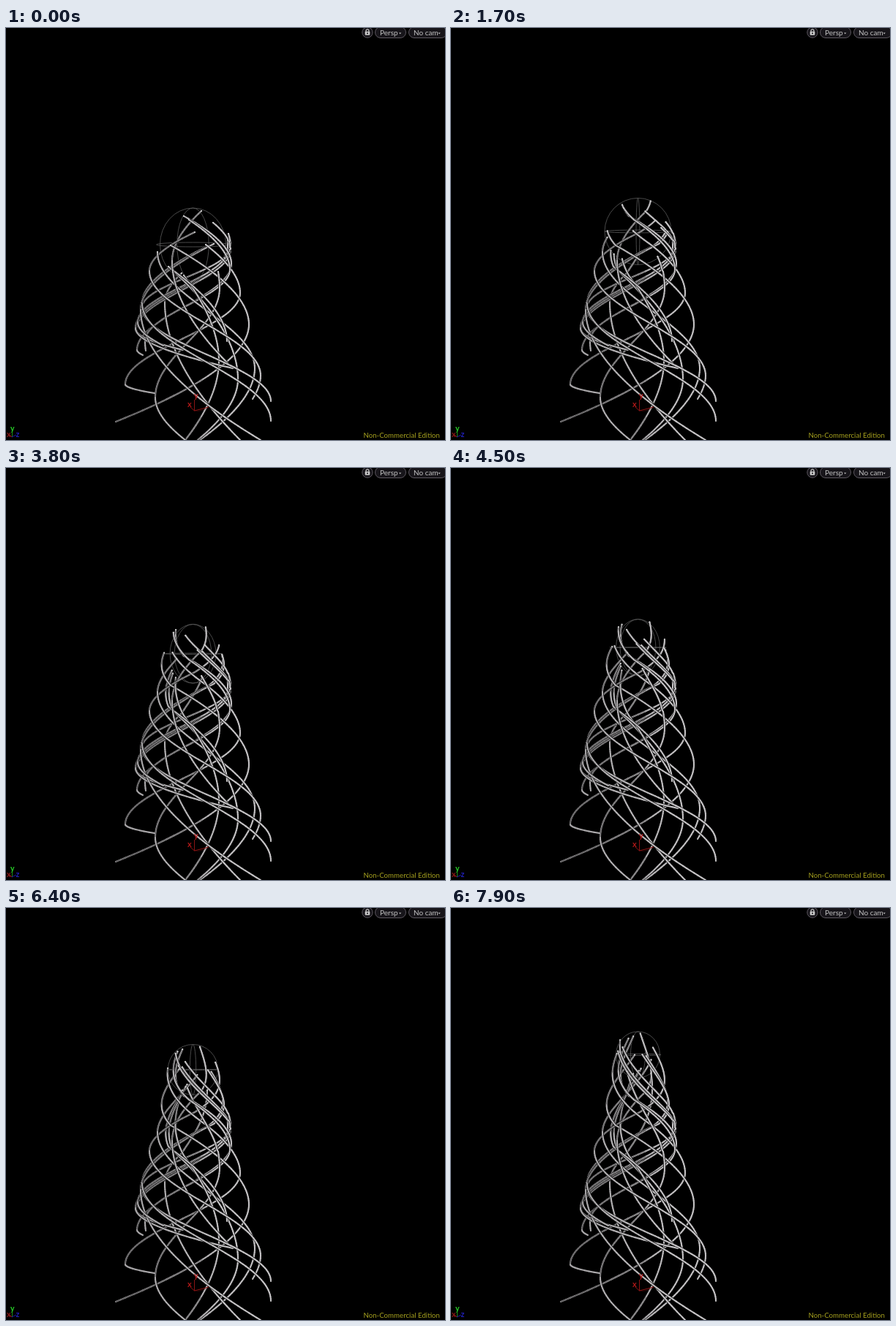
An HTML page with a canvas for the animation above (8 s loop, 600x563 px).

```html
<!DOCTYPE html>
<html>
<head>
<meta charset="utf-8">
<style>
html, body { margin: 0; width: 100%; height: 100%; overflow: hidden; background: #000; }
canvas, svg { position: absolute; left: 0; top: 0; width: 600px; height: 563px; }
text { font-family: Lato, "Open Sans", sans-serif; }
</style>
</head>
<body>
<canvas id="view" width="600" height="563"></canvas>
<svg viewBox="0 0 600 563">
  <g fill="none" stroke="#8c1414">
    <path d="M257.500 508V523L252 518M257.500 523L277 518"/>
    <path d="M257 523Q270 525 277 516" opacity=".35"/>
  </g>
  <g font-weight="bold" font-size="11" fill="#b01818">
    <text x="257" y="506">y</text>
    <text x="248" y="518">x</text>
  </g>
  <path d="M8.500 553V559" stroke="#1a8a1a"/>
  <path d="M8 559L14 556" stroke="#1a1aa8"/>
  <path d="M8 559L5 556" stroke="#a01818"/>
  <g font-weight="bold" font-size="10.500">
    <text x="6" y="551" fill="#28d028">y</text>
    <text x="1" y="559" fill="#8c1818">x</text>
    <text x="13.500" y="559" fill="#2020b8">z</text>
  </g>
  <g fill="#17151a" stroke="#5b565e">
    <circle cx="494" cy="6" r="7.200"/>
    <rect x="504.500" y="-1.500" width="42" height="15" rx="7.500"/>
    <rect x="550.500" y="-1.500" width="52" height="15" rx="7.500"/>
  </g>
  <path d="M492 5V3.800a2 2 0 0 1 4 0V5" fill="none" stroke="#ccc" stroke-width="1.200"/>
  <rect x="490.700" y="4.800" width="6.600" height="5" rx=".8" fill="#ccc"/>
  <circle cx="494" cy="7.200" r="1" fill="#17151a"/>
  <g font-size="10" fill="#c4c4c4">
    <text x="511" y="9.500">Persp</text>
    <text x="557" y="9.500">No cam</text>
    <path d="M537 6.500h3.400l-1.700 1.700zM590.500 6.500h3.400l-1.700 1.700z"/>
  </g>
  <text x="593" y="560" text-anchor="end" font-size="9.700" fill="#a6a11e">Non-Commercial Edition</text>
</svg>
<script>
const g = document.getElementById('view').getContext('2d');
const LOOP = 8000, SPIN = 17 * Math.PI / 180, CX = 255.5;

// moments at which the simulation advances, in tenths of a second
const steps = [0, 4, 6, 8, 10, 12, 14, 17, 19, 20, 21, 24, 26, 28, 30, 32, 33, 35, 38, 40,
  43, 45, 47, 50, 52, 55, 57, 59, 61, 62, 64, 67, 69, 72, 74, 77, 79];

// each strand from its tip downwards: tip, widest points left and right, root
const strands = [
  [225, 297, 332, 405, 150, 538],
  [273, 296, 320, 362, 163, 487, 203, 499],
  [207, 306, 207, 306, 340, 465, 265, 563],
  [222, 326, 317, 480, 262, 563],
  [243, 338, 291, 455, 245, 563],
  [228, 331, 302, 428],
  [267, 250, 227, 318, 310, 465],
  [290, 333, 292, 355, 204, 505, 245, 563],
  [240, 335, 217, 375, 320, 563],
  [243, 257, 308, 322, 179, 440, 187, 447],
  [250, 262, 306, 330, 190, 428, 191, 441],
  [283, 266, 307, 302, 178, 412, 242, 440],
  [304, 281, 307, 298, 177, 410, 310, 465],
  [305, 292, 306, 300, 186, 382, 362, 510, 362, 510],
  [276, 298, 186, 376, 362, 537, 362, 537],
  [258, 279, 196, 332, 348, 475, 337, 507],
  [284, 295, 184, 385, 348, 563],
  [303, 290, 303, 303, 180, 402, 215, 434]
].map(build);

function riseAt(t) { return 296 - 10.2 * t - .24 * t * t; }
function tilt(c) { return .001 * (c - 236); }
function radius(c) {
  const d = c - 296;
  return 50 + .26 * d + .0007 * d * d;
}

// a bend through p..q, upright at every widest point and free at the two ends
function bend(p, q, freeStart, freeEnd) {
  const dy = q.y - p.y, free = freeStart || freeEnd;
  const a = freeStart ? { x: q.x, y: q.y - .45 * dy } : { x: p.x, y: p.y + (free ? .45 : .38) * dy };
  const b = free ? a : { x: q.x, y: q.y - .38 * dy };
  const n = Math.max(4, Math.round(Math.hypot(q.x - p.x, dy) / 4)), out = [];
  for (let i = 0; i < n; i++) {
    const u = i / n, v = 1 - u;
    const mix = k => free
      ? v * v * p[k] + 2 * u * v * a[k] + u * u * q[k]
      : v * v * v * p[k] + 3 * u * v * v * a[k] + 3 * u * u * v * b[k] + u * u * u * q[k];
    out.push({ x: mix('x'), y: mix('y') });
  }
  return out;
}

function build(nums) {
  const knots = [];
  for (let i = 0; i < nums.length; i += 2) knots.push({ x: nums[i], y: nums[i + 1] });
  const last = knots.length - 1, tip = knots[0];
  const path = knots.slice(0, last).flatMap((p, i) =>
    p.x === knots[i + 1].x && p.y === knots[i + 1].y ? []
      : last === 1 ? bend(p, { x: knots[1].x, y: knots[1].y }, true)
      : bend(p, knots[i + 1], i === 0, i === last - 1));
  path.push(knots[last]);
  // place the tip on the sphere: a strand heading left is on the near side
  const side = knots[1].x >= tip.x ? 1 : -1, c = riseAt(0), r = radius(c), dx = tip.x - CX;
  const depth = side * Math.sqrt(Math.max(0, r * r - dx * dx - (c - tip.y) ** 2));
  const h = (c - tip.y + tilt(c) * depth) / r;
  const flat = Math.sqrt(1 - h * h);
  const az = side * Math.acos(Math.max(-1, Math.min(1, dx / r / flat)));
  return { root: path.reverse(), h, flat, az };
}

function spot(s, t) {
  const c = riseAt(t), r = radius(c), a = s.az + SPIN * t;
  return {
    x: CX + r * s.flat * Math.cos(a),
    y: c - r * s.h + tilt(c) * r * s.flat * Math.sin(a)
  };
}

function trail(s, t) {
  const pts = s.root.slice();
  for (let u = .15; u < t; u += .15) pts.push(spot(s, u));
  if (t) pts.push(spot(s, t));
  return pts;
}

// cut a trail where it turns from the near side to the far side
function halves(pts) {
  const runs = [];
  for (let i = 1; i < pts.length; i++) {
    const near = pts[i].x < pts[i - 1].x, run = runs[runs.length - 1];
    if (run && run.near === near) run.pts.push(pts[i]);
    else runs.push({ near, pts: [pts[i - 1], pts[i]] });
  }
  return runs;
}

function line(pts, color, width) {
  g.strokeStyle = color;
  g.lineWidth = width;
  g.beginPath();
  pts.forEach(p => g.lineTo(p.x, p.y));
  g.stroke();
}

function tube({ pts, near }) {
  g.lineCap = 'butt';
  line(pts, '#0c0c0c', 3.4);
  const pairs = pts.slice(1).map((p, i) => [pts[i], p]);
  g.lineCap = 'round';
  pairs.forEach(pair => {
    const light = Math.max(0, Math.min(1, (pair[0].x - 180) / 120));
    const v = Math.round((near ? 168 : 138) + (near ? 30 : 56) * light);
    line(pair, `rgb(${v},${v - 2},${v})`, 2);
  });
  g.lineCap = 'butt';
  if (!near) pairs.forEach(pair => {
    if (pair[0].x < 265) line(pair, 'rgba(25,25,25,.6)', .7);
  });
}

function guide(t) {
  const c = riseAt(t), r = radius(c), a = SPIN * t - .45;
  g.strokeStyle = '#5c5c5c';
  g.lineWidth = .8;
  [[Math.cos(a), 1], [Math.sin(a), 1], [1, tilt(c)]].forEach(([w, h]) => {
    g.beginPath();
    g.ellipse(CX, c, Math.max(.1, Math.abs(w) * r), Math.max(.1, Math.abs(h) * r), 0, 0, 7);
    g.stroke();
  });
}

function draw(t) {
  g.fillStyle = '#000';
  g.fillRect(0, 0, 600, 563);
  guide(t);
  const trails = strands.map(s => trail(s, t)), runs = trails.flatMap(halves);
  runs.filter(r => !r.near).forEach(tube);
  runs.filter(r => r.near).forEach(tube);
  g.fillStyle = '#ccc';
  trails.forEach(pts => {
    const p = pts[pts.length - 1];
    g.beginPath();
    g.arc(p.x, p.y, 1.1, 0, 7);
    g.fill();
  });
}

let shown = -1;
const start = performance.now();
function tick(now) {
  const t = Math.max(0, now - start) % LOOP / 100;
  const step = steps.filter(s => s <= t).pop();
  if (step !== shown) {
    shown = step;
    draw(step / 10);
  }
  requestAnimationFrame(tick);
}
tick(start);
</script>
</body>
</html>
```
